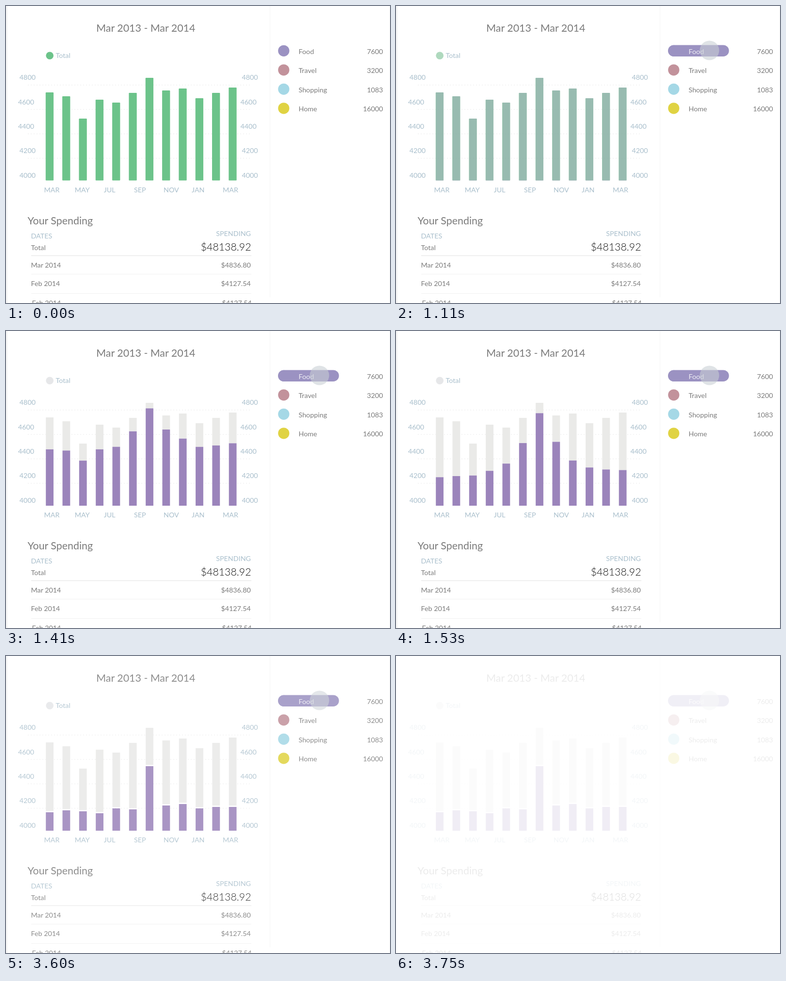
Recreate the animation shown at these times as an HTML page. Size 792 by 612 pixels, loop 3780 ms.

```html
<!DOCTYPE html>
<html lang="en">
<head>
<meta charset="utf-8">
<title>Spending chart</title>
<style>
html, body { margin: 0; width: 100%; height: 100%; overflow: hidden; background: #fff; }
svg { display: block; width: 792px; height: 612px; }
text { font: 14.3px Lato, sans-serif; fill: #7b7b7b; }
.axis { fill: #a9bfcc; }
.head { font-size: 21.4px; }
.sum { font-size: 21.3px; font-weight: 300; fill: #111; }
.end { text-anchor: end; }
</style>
</head>
<body>
<svg viewBox="0 0 792 612">
  <rect width="792" height="612" fill="#fff"/>
  <g id="page">
    <g id="back"></g>
    <g id="green" fill="#6cc38a"></g>
    <g id="split"></g>
    <g id="labels">
      <text class="head" x="186.3" y="53">Mar 2013 - Mar 2014</text>
      <text class="axis" x="102.5" y="107">Total</text>
      <text class="head" x="44.5" y="450">Your Spending</text>
      <text class="axis" x="51.5" y="478.5">DATES</text>
      <text class="axis end" x="505" y="473.5">SPENDING</text>
      <text x="51.5" y="502.5">Total</text>
      <text class="sum end" x="505.5" y="503.8">$48138.92</text>
    </g>
    <g id="list"></g>
    <rect id="pill" x="561.2" y="80.4" height="23.6" rx="11.8" fill="#9b92c2"/>
    <text id="food" x="603.5" y="98.6" style="fill:#fff">Food</text>
    <circle id="touch" cx="646.5" cy="91.5" r="20" fill="#c8cfd4"/>
  </g>
</svg>
<script>
const LOOP = 3780, STEP = 30, BASE = 360;
const $ = id => document.getElementById(id);

function set(el, attrs) {
  for (const k in attrs) el.setAttribute(k, attrs[k]);
}
function add(parent, tag, attrs, body) {
  const el = document.createElementNS('http://www.w3.org/2000/svg', tag);
  set(el, attrs);
  if (body) el.textContent = body;
  $(parent).appendChild(el);
  return el;
}
const label = (x, y, body, cls = '') => add('labels', 'text', { x, y, class: cls }, body);
const line = (x1, y1, x2, y2, stroke, dash = 'none') =>
  add('back', 'line', { x1, y1, x2, y2, stroke, 'stroke-dasharray': dash });

// Page edges
add('back', 'rect', { width: 3, height: 612, fill: '#f5f5f5' });
line(544.5, 0, 544.5, 600, '#f4f4f4');
line(791.5, 0, 791.5, 612, '#f4f4f4');

// Axes and grid
for (let i = 0; i < 5; i++) {
  const n = 4800 - 200 * i, y = 152.3 + 50.3 * i;
  const x = n === 4600 || n === 4400 ? 24.9 : 27.8;
  label(x, y, n, 'axis');
  label(x + 458.6, y, n, 'axis');
  if (i < 4) line(45, y + 10.6, 504, y + 10.6, '#e9e9e9', '2 4');
}
const months = { MAR: 78.5, MAY: 141.8, JUL: 201.8, SEP: 264, NOV: 325, JAN: 383 };
for (const m in months) label(months[m], 384.4, m, 'axis');
label(447, 384.2, 'MAR', 'axis');

// Table rows hang below their rules
function row(y, date, sum, stroke, dx = 0) {
  line(52, y, 506, y, stroke);
  label(51.5 + dx, y + 24.8, date);
  label(504.8 + dx, y + 24.8, sum, 'end');
}
row(514.5, 'Mar 2014', '$4836.80', '#e2e2e2');
row(552.5, 'Feb 2014', '$4127.54', '#f1f1f1');
row(592.5, 'Feb 2014', '$4127.54', '#f1f1f1', 2);

// Categories
[['Food', 7600, '#9b92c2'], ['Travel', 3200, '#c2929b'], ['Shopping', 1083, '#a5d8e6'], ['Home', 16000, '#e0d343']]
  .forEach(([name, n, fill], i) => {
    const y = 98.8 + i * 39.4;
    add('list', 'circle', { cx: 572.8, cy: 92.3 + i * 39.5, r: 11.6, fill });
    add('list', 'text', { x: 603.5, y }, name);
    add('list', 'text', { x: 777.6, y, class: 'end' }, n);
  });

// Chart data as bar heights: monthly total and food share
const totals = [182, 174, 128, 167, 161, 181, 212, 186, 190, 170, 181, 192];
const foods = [38, 42, 40, 36, 46, 44, 133, 52, 55, 46, 49, 49];
// Peaked shape the bars pass through on their way down
const wave = i => 46 + 1.2 * i + 136 / (1 + 0.85 * (i - 6) ** 2);

const dot = { cx: 90.2, cy: 102.3, r: 7.8 };
add('green', 'circle', dot);
add('split', 'circle', { ...dot, fill: '#e6e7e9' });
const bars = totals.map((h, i) => {
  const x = 81.8 + i * 34.32, y = BASE - h;
  add('green', 'rect', { x, y, width: 16.3, height: h - 0.5, rx: 1.2 });
  const part = fill => add('split', 'rect', { x: x + 0.4, y, width: 15.8, fill });
  return { h, food: foods[i], mid: wave(i), grey: part('#eaeae8'), tint: part('#9b84bb') };
});

const ramp = (t, a, b) => Math.min(1, Math.max(0, (t - a) / (b - a)));
const mix = (a, b, p) => a + (b - a) * p;
const ease = x => 0.5 * x + 0.5 * x * x * (3 - 2 * x);

function draw(t) {
  const grow = ramp(t, 520, 810);
  set($('pill'), { width: mix(23.7, 125.5, grow), opacity: grow > 0 ? 1 : 0 });
  set($('food'), { opacity: 0.85 * ramp(t, 705, 810) });
  set($('touch'), { opacity: 0.58 * ramp(t, 480, 780) });

  const swap = ramp(t, 1020, 1320);
  set($('green'), { opacity: 1 - swap });
  set($('split'), { opacity: swap });

  const fall = ease(ramp(t, 1260, 1560));
  const settle = ease(ramp(t, 1560, 1860));
  for (const { h, food, mid, grey, tint } of bars) {
    const now = mix(mix(h, mid, fall), food, settle);
    set(tint, { y: BASE - now, height: now });
    set(grey, { height: Math.max(0, h - now - 2.6 * settle) });
  }

  set($('page'), { opacity: 1 - ramp(t, 3570, 3780) });
}

const start = performance.now();
function tick() {
  const t = (performance.now() - start) % LOOP;
  draw(Math.floor(t / STEP) * STEP);
  requestAnimationFrame(tick);
}
draw(0);
requestAnimationFrame(tick);
</script>
</body>
</html>
```
